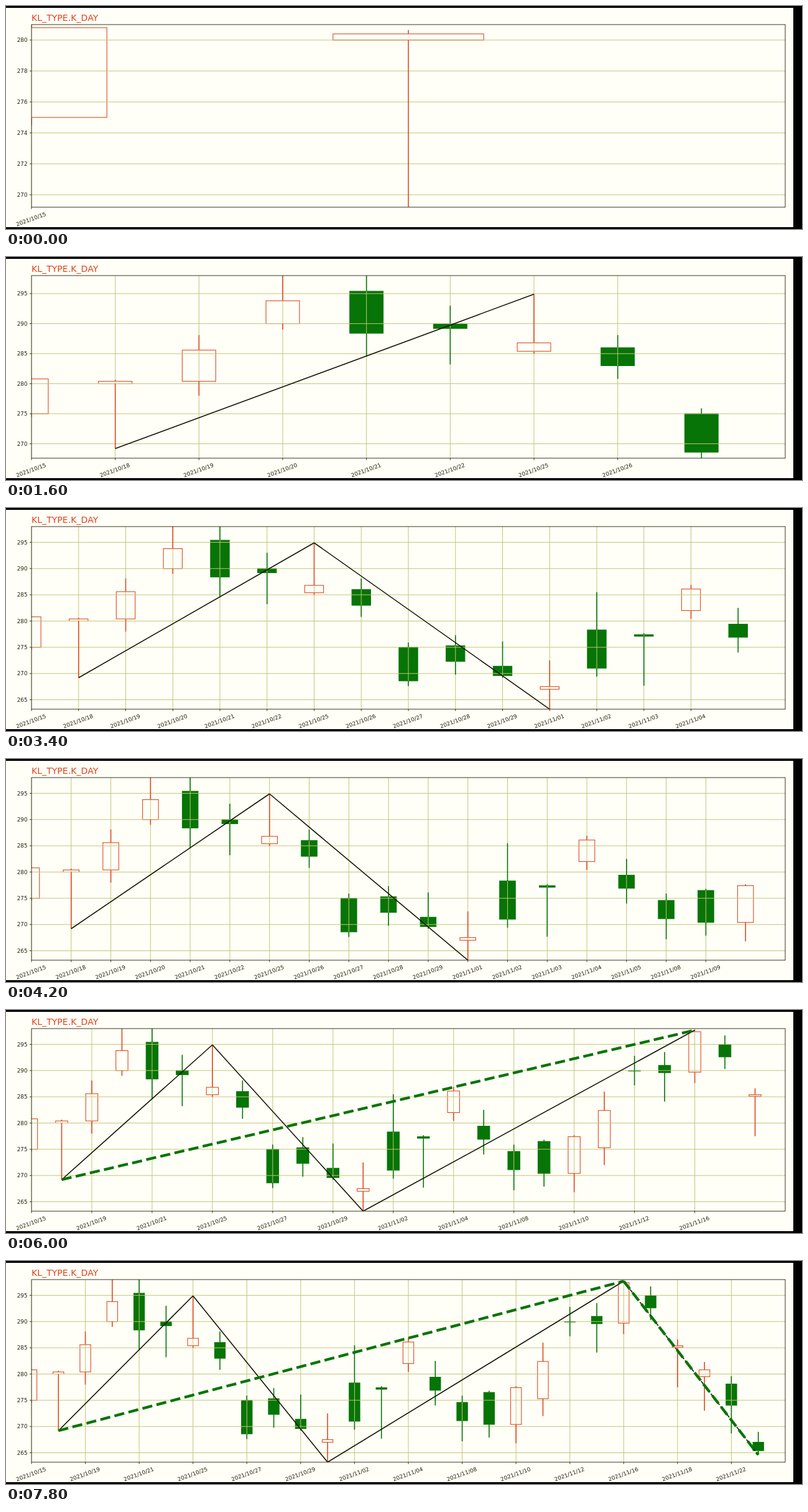
An HTML page that plays this animation: 1280 px wide and 360 px high, repeating every 8 s.

```html
<!DOCTYPE html>
<html lang="en">
<head>
<meta charset="utf-8">
<title>Daily candles</title>
<style>
  html, body { margin: 0; width: 100%; height: 100%; overflow: hidden; background: #000; }
  svg { display: block; width: 1280px; height: 360px; font: 8.8px "DejaVu Sans", sans-serif; }
  line, polyline, rect { fill: none; }
  .page { fill: #fffff8; }
  .title { font-size: 14.1px; fill: #e2431e; }
  .label { fill: #222208; }
  .grid { stroke: #c4c478; stroke-width: 1; }
  .frame { stroke: #222208; stroke-width: 0.9; }
  .up { stroke: #dd4a22; stroke-width: 1.1; }
  .down { stroke: #067406; stroke-width: 1; }
  rect.down { fill: #067406; }
  line.up, line.down { stroke-width: 1.6; }
  .stroke { stroke: #141404; stroke-width: 1.6; }
  .stroke.open { stroke-dasharray: 5.9 2.6; }
  .segment { stroke: #067406; stroke-width: 4.4; stroke-dasharray: 16.3 7; }
</style>
</head>
<body>
<svg viewBox="0 0 1280 360">
  <defs><clipPath id="plot"><rect id="clip"/></clipPath></defs>
  <rect class="page" x="0" y="3" width="1266" height="354"/>
  <g id="chart"></g>
</svg>
<script>
const LOOP = 8000;
const TOP = 30, HEIGHT = 294.8, WIDTH = 1212, BOTTOM = TOP + HEIGHT;

// open, close, high, low per weekday
const candles = [
  [275, 280.8, 281, 274.5], [280, 280.4, 280.65, 269.2], [280.4, 285.6, 288.1, 278],
  [290, 293.8, 298, 289], [295.4, 288.4, 298, 284.5], [290, 289.2, 293, 283.2],
  [285.4, 286.8, 294.9, 285], [286, 283, 288.1, 280.8], [275, 268.6, 275.9, 267.6],
  [275.3, 272.3, 277.3, 269.8], [271.4, 269.6, 276.1, 269.2], [267, 267.5, 272.5, 263.2],
  [278.3, 271, 285.5, 269.4], [277.4, 277.1, 277.7, 267.7], [282, 286.1, 286.9, 280.4],
  [279.4, 276.9, 282.5, 274], [274.6, 271.1, 275.9, 267.2], [276.5, 270.4, 276.8, 267.9],
  [270.4, 277.4, 277.7, 266.8], [275.3, 282.4, 286, 272], [289.95, 289.9, 292.8, 287.2],
  [291, 289.6, 293.5, 284.1], [289.7, 297.4, 297.7, 287.6], [294.95, 292.6, 296.7, 290.3],
  [285.1, 285.4, 286.6, 277.5], [279.5, 280.8, 282.3, 273], [278.1, 274.05, 279.6, 268.7],
  [267, 265.4, 269, 264.6]
].map(([open, close, high, low]) => ({ open, close, high, low }));

// [time in ms, number of candles shown]
const steps = [
  [0, 2], [400, 3], [600, 4], [800, 5], [1000, 6], [1200, 8], [1600, 9], [1800, 10],
  [2000, 11], [2200, 12], [2600, 13], [2800, 14], [3200, 15], [3400, 16], [3600, 17],
  [4000, 18], [4200, 19], [4600, 20], [4800, 21], [5200, 22], [5400, 23], [5800, 24],
  [6000, 25], [6600, 26], [7200, 27], [7800, 28]
];

// Legs of the zigzag: candle indices and the count at which each appears
const legs = [
  { from: 1, to: 6, since: 8 }, { from: 6, to: 11, since: 11 },
  { from: 11, to: 22, since: 20 }, { from: 22, to: 27, since: 27 }
];

const dates = [];
for (let day = new Date(Date.UTC(2021, 9, 15)); dates.length < candles.length;
     day.setUTCDate(day.getUTCDate() + 1)) {
  if (day.getUTCDay() % 6) dates.push(day.toISOString().slice(0, 10).replaceAll("-", "/"));
}

const line = (cls, x1, y1, x2, y2) =>
  `<line class="${cls}" x1="${x1}" y1="${y1}" x2="${x2}" y2="${y2}"/>`;
const rect = (cls, x, y, w, h) =>
  `<rect class="${cls}" x="${x}" y="${y}" width="${w}" height="${h}"/>`;

function render(count) {
  const shown = candles.slice(0, count);
  const max = Math.max(...shown.map(c => c.high));
  const min = Math.min(...shown.map(c => c.low));
  const tick = [1, 2, 2.5, 5].find(s => (max - min) / s <= 9);
  const digits = tick % 1 ? 1 : 0;
  const left = digits ? 48 : 41; // wider labels push the plot right
  const gap = WIDTH / count;
  const x = i => left + i * gap;
  const y = v => TOP + (max - v) / (max - min) * HEIGHT;

  let boxes = "", wicks = "", grid = "", axes = "", strokes = "", segments = "";

  shown.forEach((c, i) => {
    const cls = c.close > c.open ? "up" : "down";
    const top = y(Math.max(c.open, c.close)), base = y(Math.min(c.open, c.close));
    boxes += rect(cls, x(i) - gap * 0.2, top, gap * 0.4, base - top);
    wicks += line(cls, x(i), y(c.high), x(i), top) + line(cls, x(i), base, x(i), y(c.low));
  });

  for (let v = Math.ceil(min / tick) * tick; v <= max; v += tick) {
    grid += line("grid", left, y(v), left + WIDTH, y(v));
    axes += line("frame", left - 3, y(v), left, y(v)) +
      `<text class="label" x="${left - 6.5}" y="${y(v) + 3.3}" text-anchor="end">${v.toFixed(digits)}</text>`;
  }

  const every = Math.max(1, Math.floor(count / 10));
  for (let i = 0; i < count - 1; i += every) {
    grid += line("grid", x(i), TOP, x(i), BOTTOM);
    axes += line("frame", x(i), BOTTOM, x(i), BOTTOM + 3) +
      `<text class="label" text-anchor="middle" y="3.2" transform="translate(${x(i) - 0.8} 344) rotate(-20)">${dates[i]}</text>`;
  }

  const connect = (cls, from, to, rising) => {
    const [a, b] = rising ? ["low", "high"] : ["high", "low"];
    return line(cls, x(from), y(candles[from][a]), x(to), y(candles[to][b]));
  };
  legs.forEach(({ from, to, since }, i) => {
    if (count < since) return;
    const last = count - 1;
    strokes += connect(last <= to ? "stroke open" : "stroke", from, Math.min(to, last), i % 2 === 0);
  });
  if (count >= 23) segments += connect("segment", 1, 22, true);
  else if (count >= 20) segments += connect("segment", 1, 6, true) + connect("segment", 6, 11, false);
  if (count >= 27) segments += connect("segment", 22, count - 1, false);

  const clip = document.getElementById("clip");
  Object.entries({ x: left, y: TOP, width: WIDTH, height: HEIGHT })
    .forEach(([key, value]) => clip.setAttribute(key, value));
  document.getElementById("chart").innerHTML =
    `<g clip-path="url(#plot)">${boxes}${grid}${wicks}${strokes}${segments}</g>` +
    rect("frame", left, TOP, WIDTH, HEIGHT) + axes +
    `<text class="title" x="${left}" y="24.3">KL_TYPE.K_DAY</text>`;
}

const start = performance.now();
let current = 0;
function play(now) {
  const time = Math.max(0, now - start) % LOOP;
  const count = steps.findLast(([at]) => at <= time)[1];
  if (count !== current) render(current = count);
  requestAnimationFrame(play);
}
play(start);
</script>
</body>
</html>
```
